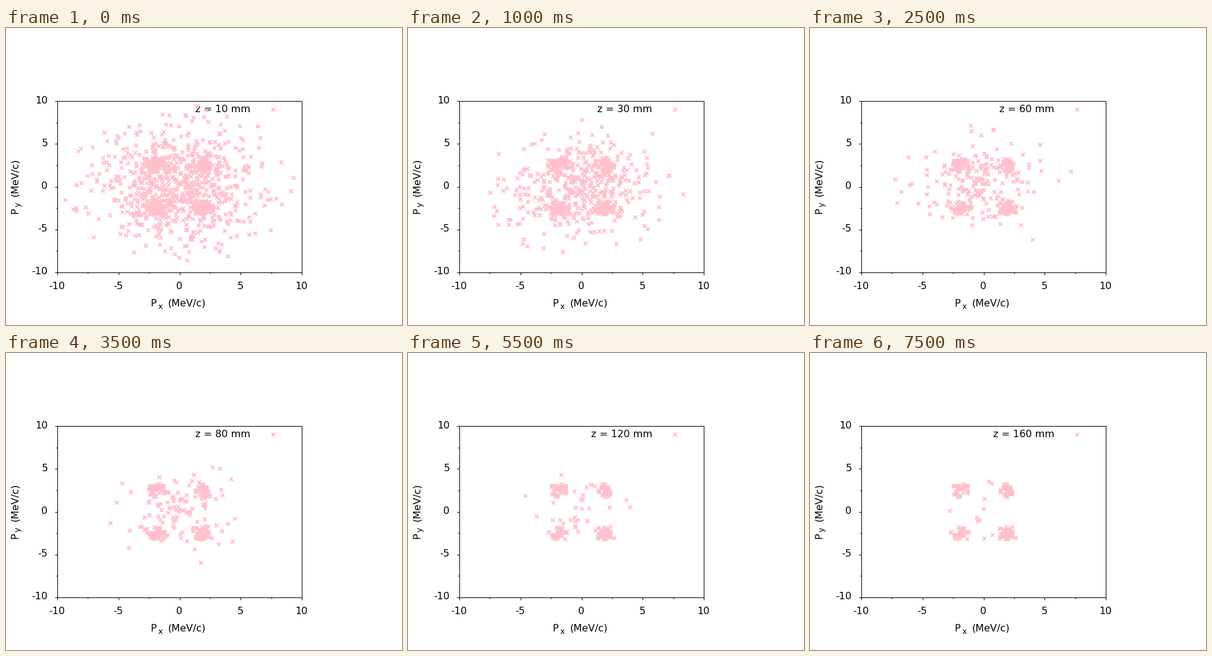
Write a matplotlib script that moves like this. It is 640 px wide and 480 px high and loops after 8000 ms.

```python
import itertools

import numpy as np
import matplotlib.pyplot as plt
from matplotlib.animation import FuncAnimation

W, H, DPI = 640, 480, 100
FRAMES, STEP_MS = 16, 500
PX = 72 / DPI
PINK = "#ffc0cb"
LEFT, RIGHT, TOP, BOTTOM = 83, 478, 118, 395

plt.rcParams["font.family"] = "DejaVu Sans"
fig = plt.figure(figsize=(W / DPI, H / DPI), dpi=DPI, facecolor="white")
ax = fig.add_axes([LEFT / W, 1 - BOTTOM / H, (RIGHT - LEFT) / W, (BOTTOM - TOP) / H])
ax.set(xlim=(-10, 10), ylim=(-10, 10), facecolor="none")
ticks = np.arange(-10, 11, 5)
for axis in (ax.xaxis, ax.yaxis):
    axis.set_ticks(ticks, labels=[])
    axis.set_ticks(ticks[:-1] + 2.5, minor=True)
ax.tick_params(length=4 * PX, width=PX)
ax.tick_params(which="minor", length=2 * PX, width=PX)
for spine in ax.spines.values():
    spine.set_linewidth(PX)


def label(x, y, text, size=16, **kw):
    """Text with its baseline at stage pixel (x, y)."""
    return fig.text(x / W, 1 - y / H, text, fontsize=size * PX, va="baseline",
                    rotation_mode="anchor", **kw)


for t in ticks:
    label(280 + t * 19.75, 422, str(t), ha="center")
    label(67.5, 260 - t * 13.8, str(t), ha="right")

label(233.5, 450, "P")
label(246, 454, "x", 12.8)
label(262, 450, "(MeV/c)")
label(19, 300.5, "P", rotation=90)
label(23, 289, "y", 12.8, rotation=90)
label(19, 272.5, "(MeV/c)", rotation=90)

caption = label(394.5, 136, "", ha="right")
caption.set_zorder(-1)
cross = dict(ls="none", marker="x", color=PINK, ms=5.2 * PX, mew=2 * PX)
dots, = ax.plot([], [], clip_on=False, **cross)
ax.plot([7.65], [9.0], **cross)

# Beam spots in the four quadrants: a lasting core and a part that fades along z
rng = np.random.default_rng(7)
core, fading = [rng.normal(0, 1.1, (5, 2))], []
for sign in itertools.product((-1, 1), repeat=2):
    spot = np.column_stack([rng.triangular(1.1, 2.0, 2.75, 34),
                            rng.triangular(1.4, 2.8, 3.4, 34)])
    core.append(spot * sign)
    fading.append(rng.normal((1.95, 2.6), 0.48, (45, 2)) * sign)
core = np.vstack(core)


def cloud(k):
    """Background that thins out and narrows along z, plus a few wide strays."""
    gen = np.random.default_rng(40 + k)
    count = int(720 * np.exp(-k / 3.6) - 10)
    reach = 9.6 - 0.4 * k
    pts = gen.normal(0, 3.3 - 0.16 * k, (count, 2))
    pts = pts[np.hypot(*pts.T) < reach]
    angle = gen.uniform(0, 2 * np.pi, 4)
    radius = reach * gen.uniform(0.75, 1, 4)
    strays = np.column_stack([radius * np.cos(angle), radius * np.sin(angle)])
    return np.vstack([pts, strays])


def draw(k):
    left = round(45 * np.exp(-k / 4.5))
    pts = np.vstack([core, cloud(k)] + [f[:left] for f in fading])
    dots.set_data(pts[:, 0], pts[:, 1])
    caption.set_text(f"z = {10 * (k + 1)} mm")
    return dots, caption


anim = FuncAnimation(fig, draw, frames=FRAMES, interval=STEP_MS,
                     repeat=True, repeat_delay=0, blit=False)
plt.show()
```
